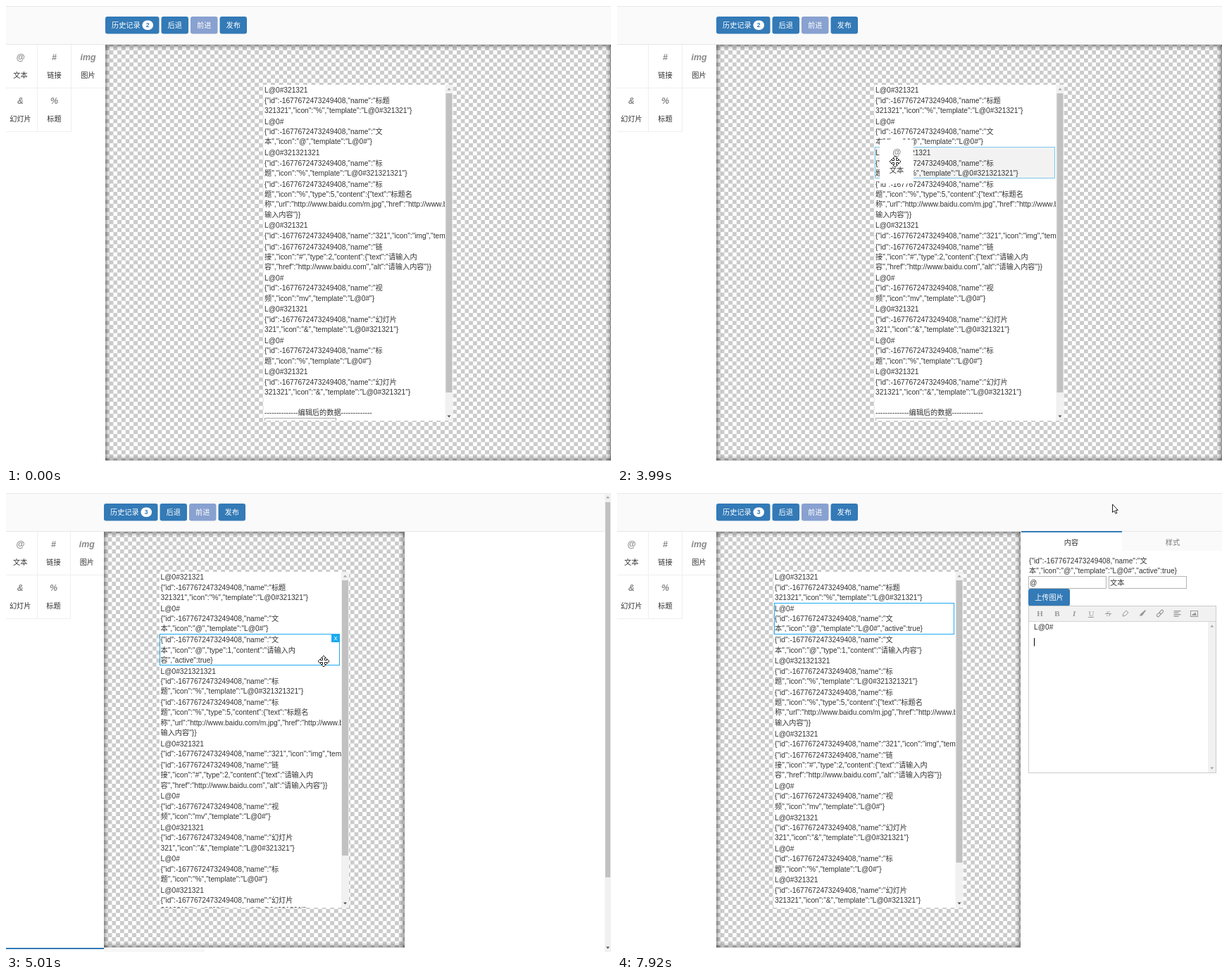
Write an HTML page with a canvas that moves like this. It is 859 by 652 pixels and loops after 8 s.

```html
<!DOCTYPE html>
<html lang="zh">
<head>
<meta charset="utf-8">
<style>
  html, body { margin: 0; width: 100%; height: 100%; overflow: hidden; background: #fff; }
  canvas { display: block; }
</style>
</head>
<body>
<canvas id="stage" width="859" height="652"></canvas>
<script>
const ctx = document.getElementById('stage').getContext('2d');
const LOOP = 8000, SCALE = 0.717, LINE = 20 * SCALE, GAP = 2 * SCALE;
const LIST_TOP = 112, LIST_BOTTOM = 589;
const BLUE = '#337ab7', ACTIVE = '#1caaf0', SIZE = 10.2;
const FAMILY = '"Liberation Sans", Arial, "Noto Sans CJK SC", "Noto Sans CJK", sans-serif';

// ---- data ----
const ID = '{"id":-1677672473249408,"name":"';
const template = (code, name, icon) => ({
  icon, name: name.replace('\n', ''), code: 'L@0#' + code,
  json: `${ID}${name}","icon":"${icon}","template":"L@0#${code}"}`
});
const plain = (name, icon, rest) => ({
  icon, name: name.replace('\n', ''), json: `${ID}${name}","icon":"${icon}",${rest}}`
});
const before = [
  template('321321', '标题\n321321', '%'),
  template('', '文\n本', '@'),
  template('321321321', '标\n题', '%'),
  plain('标\n题', '%', '"type":5,"content":{"text":"标题名\n称","url":"http://www.baidu.com/m.jpg","href":"http://www.baidu.com","alt":"请\n输入内容"}'),
  template('321321', '321', 'img'),
  plain('链\n接', '#', '"type":2,"content":{"text":"请输入内\n容","href":"http://www.baidu.com","alt":"请输入内容"}'),
  template('', '视\n频', 'mv'),
  template('321321', '幻灯片\n321', '&'),
  template('', '标\n题', '%'),
  template('321321', '幻灯片\n321321', '&')
];
const added = plain('文\n本', '@', '"type":1,"content":"请输入内容"');
const after = [...before.slice(0, 2), added, ...before.slice(2)];
const tools = [['@', '文本'], ['#', '链接'], ['img', '图片'], ['&', '幻灯片'], ['%', '标题']];

const activeJson = item => item.json.slice(0, -1) + ',"active":true}';
function itemLines(item, active) {
  let json = active ? activeJson(item) : item.json;
  if (active && item === added) json = json.replace('内容', '内\n容');
  return (item.code ? item.code + '\n' + json : json).split('\n');
}

// ---- pointer: start, end, steps, from, to ----
const moves = [
  [270, 880, 9, 590, 552, 65, 94],
  [1200, 1500, 5, 65, 93, 22, 91],
  [3300, 3380, 2, 22, 91, 21, 88],
  [3530, 3990, 7, 21, 88, 395, 221],
  [4060, 4310, 5, 395, 221, 451, 235],
  [4850, 5010, 3, 451, 235, 451, 239],
  [5090, 5390, 5, 451, 239, 352, 311],
  [5460, 5460, 1, 352, 311, 350, 313],
  [6080, 6540, 7, 350, 313, 360, 427],
  [6920, 7460, 8, 360, 427, 361, 180],
  [7840, 7920, 2, 361, 180, 703, 16]
];
function pointerAt(t) {
  const move = moves.filter(m => t >= m[0]).pop();
  if (!move) return null;
  const [start, end, n, x0, y0, x1, y1] = move;
  const step = n > 1 ? Math.floor((t - start) / ((end - start) / (n - 1)) + 0.001) : 0;
  const p = Math.min(1, (step + 1) / n);
  return { x: x0 + (x1 - x0) * p, y: y0 + (y1 - y0) * p };
}
const within = (t, a, b) => t >= a && t < b;
const pressed = t => within(t, 5770, 5920) || within(t, 6620, 6770) || within(t, 7540, 7690);
const activeAt = t => t < 4620 ? -1 : t < 5920 ? 2 : t < 6770 ? 4 : t < 7690 ? 7 : 1;

// ---- drawing helpers ----
function rect(x, y, w, h, color) { ctx.fillStyle = color; ctx.fillRect(x, y, w, h); }
function frame(x, y, w, h, color) {
  ctx.strokeStyle = color; ctx.lineWidth = 1; ctx.strokeRect(x + 0.5, y + 0.5, w - 1, h - 1);
}
function round(x, y, w, h, r, color) {
  ctx.fillStyle = color; ctx.beginPath(); ctx.roundRect(x, y, w, h, r); ctx.fill();
}
function text(s, x, y, color = '#333', align = 'left', size = SIZE, style = '', family = FAMILY) {
  ctx.font = `${style} ${size}px ${family}`;
  ctx.fillStyle = color; ctx.textAlign = align;
  ctx.fillText(s, x, y + size * 0.36);
}
function poly(points, fill, stroke) {
  ctx.beginPath();
  points.forEach(([x, y]) => ctx.lineTo(x, y));
  ctx.closePath();
  ctx.fillStyle = fill; ctx.fill();
  if (stroke) { ctx.strokeStyle = stroke; ctx.lineWidth = 1; ctx.stroke(); }
}
function clipped(x, y, w, h, draw) {
  ctx.save(); ctx.beginPath(); ctx.rect(x, y, w, h); ctx.clip(); draw(); ctx.restore();
}
function button(label, x, y, w, color = BLUE) {
  round(x, y, w, 24.5, 3, color);
  text(label, x + w / 2, y + 12.3, '#fff', 'center');
}
function scrollbar(x, y, w, h, thumbTop, thumbBottom, dark = '#505050') {
  rect(x, y, w, h, '#f1f1f1');
  if (thumbBottom) rect(x + 1, thumbTop, w - 2, thumbBottom - thumbTop, '#c1c1c1');
  const c = x + w / 2, top = y + 6, end = y + h - 6;
  poly([[c - 2.5, top + 1.5], [c, top - 1.5], [c + 2.5, top + 1.5]], '#a3a3a3');
  poly([[c - 2.5, end - 1.5], [c, end + 1.5], [c + 2.5, end - 1.5]], dark);
}

const tile = document.createElement('canvas');
tile.width = tile.height = 16;
const tileCtx = tile.getContext('2d');
tileCtx.fillStyle = '#fff'; tileCtx.fillRect(0, 0, 16, 16);
tileCtx.fillStyle = '#cbcbcb'; tileCtx.fillRect(0, 0, 8, 8); tileCtx.fillRect(8, 8, 8, 8);
const checker = ctx.createPattern(tile, 'repeat');

function drawBoard(left, right) {
  const top = 55, bottom = 645.5, depth = 8;
  checker.setTransform(new DOMMatrix([SCALE, 0, 0, SCALE, left, 0]));
  rect(left, top, right - left, bottom - top, checker);
  const shade = (x0, y0, x1, y1, x, y, w, h) => {
    const g = ctx.createLinearGradient(x0, y0, x1, y1);
    g.addColorStop(0, 'rgba(0,0,0,.36)');
    g.addColorStop(0.5, 'rgba(0,0,0,.12)');
    g.addColorStop(1, 'rgba(0,0,0,0)');
    rect(x, y, w, h, g);
  };
  const w = right - left, h = bottom - top;
  shade(0, top, 0, top + depth, left, top, w, depth);
  shade(0, bottom, 0, bottom - depth, left, bottom - depth, w, depth);
  shade(left, 0, left + depth, 0, left, top, depth, h);
  shade(right, 0, right - depth, 0, right - depth, top, depth, h);
}

function drawHeader(left, width, count) {
  rect(0, 0, width, 54, '#fafafa');
  rect(0, 0, width, 1, '#e7e7e7');
  rect(0, 54, width, 1, '#e7e7e7');
  button('', left, 15, 76.5);
  text('历史记录', left + 9, 27.3, '#fff');
  round(left + 52.5, 20.5, 15.5, 13.5, 6.7, '#fff');
  text(count, left + 60.2, 27.3, BLUE, 'center', 8.7, 'bold');
  button('后退', left + 79.5, 15, 38.5);
  button('前进', left + 121, 15, 38.5, '#88a1d0');
  button('发布', left + 162.5, 15, 38.5);
}

function drawTool([icon, label], x, y) {
  text(icon, x, y + 18, '#888', 'center', 12.4, 'italic bold');
  text(label, x, y + 43, '#333', 'center');
}
function drawSidebar(left, dragging) {
  const k = left / 141;
  tools.forEach((tool, i) => {
    const x = (20.5 + i % 3 * 48) * k, y = i < 3 ? 55 : 117;
    if (!(dragging && i === 0)) drawTool(tool, x, y);
    if (i !== 2) rect(Math.round(x + 23.5), y, 1, 62, '#efefef');
    rect(x - 24, y + 61, 48 * k, 1, '#efefef');
  });
}

function drawList(t, x, pointer) {
  const items = t < 4620 ? before : after, active = activeAt(t);
  const dragging = within(t, 3530, 4620), canHover = !within(t, 4620, 4770);
  rect(x, LIST_TOP, 269, LIST_BOTTOM - LIST_TOP, '#fff');
  clipped(x, LIST_TOP, 258, LIST_BOTTOM - LIST_TOP, () => {
    let y = LIST_TOP;
    items.forEach((item, i) => {
      const lines = itemLines(item, i === active), h = lines.length * LINE + GAP;
      const hover = pointer && canHover && pointer.x > x && pointer.x < x + 257 && pointer.y >= y && pointer.y < y + h;
      const bx = Math.floor(x + 0.5), by = Math.floor(y), bw = 256, bh = Math.round(y + h) - by;
      ctx.globalAlpha = hover && pressed(t) ? 0.65 : 1;
      if (hover && dragging) {
        rect(bx, by, bw, bh, '#f2f2f2');
        frame(bx, by, bw, bh, '#7cc8ea');
      } else if (i === active) {
        frame(bx, by, bw, bh, ACTIVE);
      } else if (hover) {
        ctx.setLineDash([1, 1]);
        frame(bx, by, bw, bh, ACTIVE);
        ctx.setLineDash([]);
      }
      lines.forEach((line, n) => text(line, x + 1.5, y + 7.6 + n * LINE));
      if (hover && !dragging) {
        rect(bx + bw - 12, by, 12, 12, ACTIVE);
        text('x', bx + bw - 6, by + 5.5, '#fff', 'center', 9);
      }
      ctx.globalAlpha = 1;
      y += h;
    });
    text('--------------编辑后的数据-------------', x + 1.5, y + 20.5);
    frame(Math.round(x + 1.5), Math.round(y + 28.5), 102, 40, '#a9a9a9');
  });
  const thumbEnd = t < 4620 ? 549 : t < 5920 ? 515 : 525;
  scrollbar(x + 258, LIST_TOP, 11, LIST_BOTTOM - LIST_TOP, 124, thumbEnd);
}

function drawEditor(code, y, caret) {
  rect(584, y, 267, 238, '#fff');
  rect(584, y, 267, 23, '#f1f1f1');
  scrollbar(839, y + 23, 11.5, 214, 0, 0, '#a3a3a3');
  rect(584, y + 22, 267, 1, '#d4d4d4');
  frame(584, y, 267, 238, '#ccc');
  const cy = y + 11, gray = '#999', serif = '"Liberation Serif", serif';
  [['H', 'bold'], ['B', 'bold'], ['I', 'italic bold'], ['U', ''], ['S', '']].forEach(([s, style], i) =>
    text(s, 600.5 + i * 24.3, cy, gray, 'center', 11, style, serif));
  rect(669, cy + 5, 8, 1, gray);
  rect(693, cy, 9, 1, gray);
  poly([[718, cy + 4], [719, cy], [723, cy - 4], [726, cy - 1], [722, cy + 3]], '#f1f1f1', gray);
  poly([[742, cy + 4], [743, cy + 1], [750, cy - 5], [751, cy - 4], [746, cy + 3]], gray);
  ctx.strokeStyle = gray; ctx.lineWidth = 1.2;
  for (const side of [-1, 1]) {
    ctx.save();
    ctx.translate(771 + side * 2, cy - side * 2); ctx.rotate(-Math.PI / 4);
    ctx.beginPath(); ctx.roundRect(-3, -1.8, 6, 3.6, 1.8); ctx.stroke();
    ctx.restore();
  }
  [10, 7, 10, 7].forEach((w, i) => rect(790.5, cy - 4 + i * 2.5, w, 1.3, gray));
  frame(814, cy - 4, 11, 9, gray);
  poly([[816, cy + 3], [818, cy], [819, cy + 1], [821, cy - 2], [823, cy + 3]], gray);
  text(code, 592, y + 30.5);
  if (caret) rect(592, y + 46, 1, 11.5, '#000');
}

function drawPanel(t) {
  const item = after[activeAt(t)], lines = activeJson(item).split('\n');
  rect(717, 55, 142, 27, '#fafafa');
  rect(574, 54, 143, 2, BLUE);
  text('内容', 645, 70, '#333', 'center');
  text('样式', 789, 70, '#777', 'center');
  lines.forEach((line, i) => text(line, 585, 96.2 + i * LINE));
  const y = 118 + Math.round((lines.length - 2) * LINE);
  [item.icon, item.name].forEach((value, i) => {
    frame(584 + i * 114, y, 111, 18, '#b4b4b4');
    text(value, 586 + i * 114, y + 9.3);
  });
  button('上传图片', 584, y + 18, 59);
  if (item.code) drawEditor(item.code, y + 42, (t - 6770) % 1000 < 500);
}

function drawPointer({ x, y }, move) {
  ctx.save();
  ctx.translate(x, y);
  if (move) {
    const arm = [[-1.5, -1.5], [-1.5, -4.5], [-3.5, -4.5], [0, -8], [3.5, -4.5], [1.5, -4.5]];
    const points = [];
    for (let i = 0, c = 1, s = 0; i < 4; i++, [c, s] = [-s, c])
      arm.forEach(([px, py]) => points.push([px * c - py * s, px * s + py * c]));
    poly(points, '#fff', '#222');
  } else {
    poly([[0.5, 0], [0.5, 11.5], [3, 9.2], [5, 13.3], [6.8, 12.5], [5, 8.5], [8.3, 8.3]], '#fff', '#222');
  }
  ctx.restore();
}

function render(t) {
  const overflow = within(t, 4620, 5090);
  const left = overflow ? 139 : 141, width = overflow ? 850 : 859;
  const step = Math.min(4, Math.max(0, Math.floor((t - 4690) / 80))) / 4;
  const shrink = step * step * (3 - 2 * step);
  const right = t < 4620 ? 859 : overflow ? 850 - 284 * shrink : 573;
  const listX = (left + right) / 2 - 134.5;
  const dragging = within(t, 3530, 4620), pointer = pointerAt(t);

  rect(0, 0, 859, 652, '#fff');
  drawHeader(left, width, t < 4620 ? '2' : '3');
  drawSidebar(left, dragging);
  drawBoard(left, right);
  drawList(t, listX, pointer);
  if (overflow) {
    rect(0, 646, 139, 2, BLUE);
    rect(139, 647, 143, 5, '#f7f7f7');
    scrollbar(850, 0, 9, 652, 13, 546);
  } else if (t >= 5090) drawPanel(t);

  if (!pointer) return;
  if (dragging) {
    rect(pointer.x - 22, pointer.y - 31, 48, 62, '#fff');
    drawTool(tools[0], pointer.x + 2, pointer.y - 31);
  }
  const overList = pointer.x > listX && pointer.x < listX + 258 && pointer.y > LIST_TOP && pointer.y < LIST_BOTTOM;
  const overTools = pointer.x < left && pointer.y > 55 && pointer.y < 179;
  drawPointer(pointer, dragging || overList || overTools);
}

function tick() {
  render(performance.now() % LOOP);
  requestAnimationFrame(tick);
}
tick();
</script>
</body>
</html>
```
